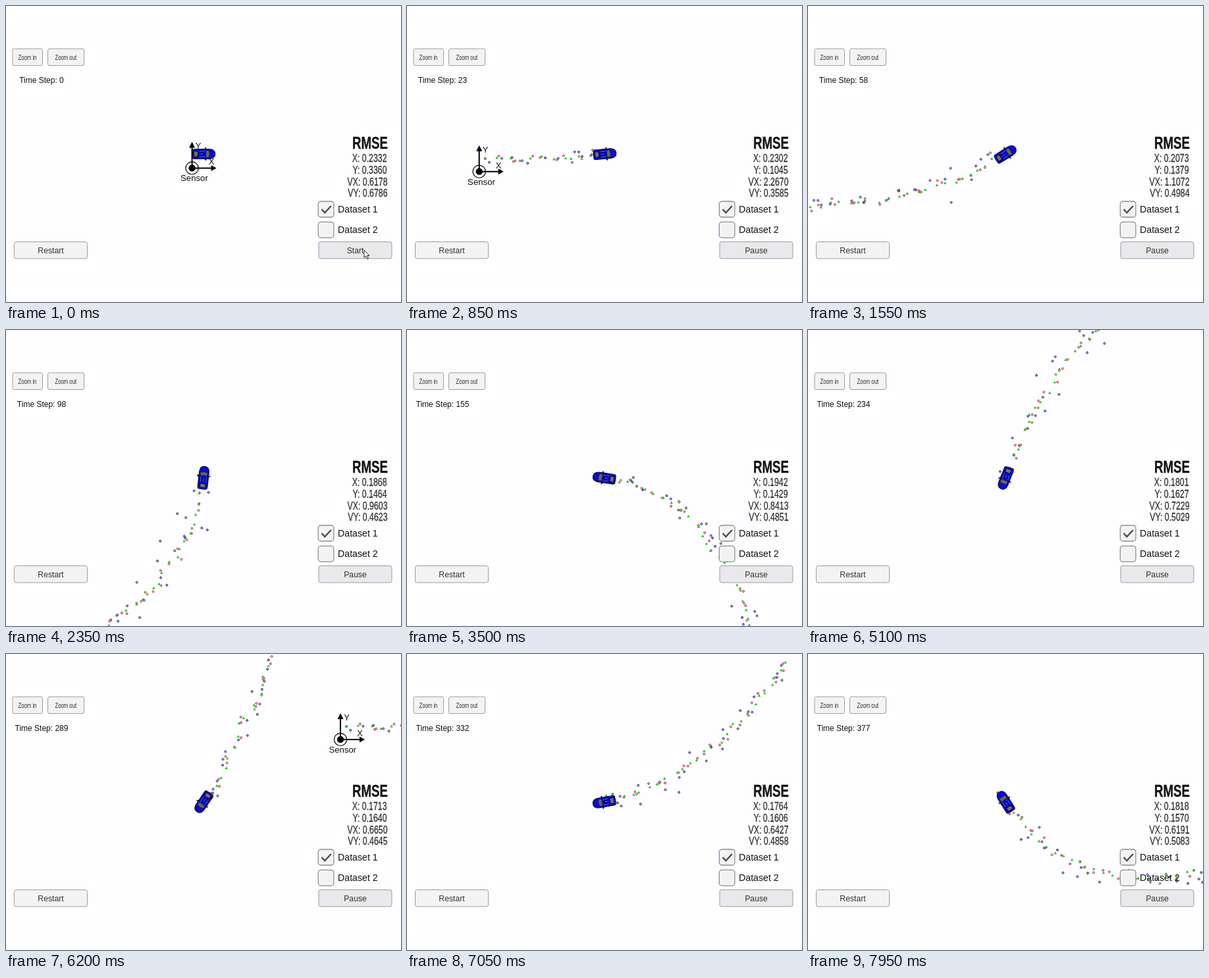
An HTML page for the animation above (8000 ms loop, 600 by 450 pixels).

```html
<!DOCTYPE html>
<html lang="en">
<head>
<meta charset="utf-8">
<title>Tracking simulator</title>
<style>
html, body { margin: 0; width: 100%; height: 100%; overflow: hidden; background: #fefdff; }
svg { display: block; width: 600px; height: 450px; }
text { font-family: "Liberation Sans", Arial, sans-serif; fill: #111; }
.btn { stroke: #9c9c9e; stroke-width: 1; }
.label { font-size: 12.2px; fill: #333; text-anchor: middle; }
.narrow { font-size: 15.8px; fill: #2c2c2c; stroke: #2c2c2c; stroke-width: .25; text-anchor: end; }
.small { font-size: 11px; fill: #2c2c2c; text-anchor: middle; }
.laser { fill: #fff; stroke: #a01020; }
.radar { fill: #e4e4f4; stroke: #06065c; }
.guess { fill: #1ec41e; }
</style>
</head>
<body>
<svg viewBox="0 0 600 450">
  <rect width="600" height="450" fill="#fefdff"/>
  <g id="trail"></g>
  <g id="car">
    <path d="M2 -7.8L3.5 -9.2V-7M2 7.8L3.5 9.2V7" fill="none" stroke="#05052a" stroke-width="1.3"/>
    <path d="M-16.5 -6.2Q-16 -7.4 -13 -7.4H9Q17.8 -7 17.8 0Q17.8 7 9 7.4H-13Q-16 7.4 -16.5 6.2Q-17.5 0 -16.5 -6.2Z" fill="#0b0bdc" stroke="#04043c" stroke-width="1"/>
    <path d="M-14.5 -5.2Q-9 -6.2 -7.5 -4.6V4.6Q-9 6.2 -14.5 5.2Q-15.4 0 -14.5 -5.2Z" fill="#0a0a50"/>
    <path d="M-13.6 -3.9L-9.2 -3.3V3.3L-13.6 3.9Q-14.2 0 -13.6 -3.9Z" fill="#74746a"/>
    <path d="M3 -4.6L8 -6Q11 0 8 6L3 4.6Q4.6 0 3 -4.6Z" fill="#66665e" stroke="#0a0a40" stroke-width=".8"/>
    <path d="M-7 -6H3M-7 6H3M-6 -2.4H0Q1.4 0 0 2.4H-6" fill="none" stroke="#05054a" stroke-width=".9"/>
    <path d="M-6 -4.2H2M-6 4.2H2M-5 0H-1" stroke="#3a70f0" stroke-width=".9"/>
    <path d="M11 -4.6Q14 -3.6 15 -2M11 4.6Q14 3.6 15 2" fill="none" stroke="#0505a0" stroke-width=".8"/>
  </g>
  <g id="sensor">
    <path d="M0 0V-33M0 0H31" stroke="#000" stroke-width="2" fill="none"/>
    <path d="M0 -40L4.5 -31H-4.5ZM37 0L29 -4.5V4.5Z"/>
    <circle r="9.6" fill="none" stroke="#000" stroke-width="1.2"/>
    <circle r="5.2"/>
    <text x="9.5" y="-29" font-size="13" text-anchor="middle">Y</text>
    <text x="29.5" y="-5" font-size="13" text-anchor="middle">X</text>
    <text x="3.3" y="20" font-size="13.2" text-anchor="middle">Sensor</text>
  </g>

  <g fill="#f4f3f4">
    <rect class="btn" x="10" y="65" width="45.5" height="25.5" rx="2.5"/>
    <rect class="btn" x="63.5" y="65" width="55" height="25.5" rx="2.5"/>
    <rect class="btn" x="12.5" y="358.5" width="111" height="25.5" rx="3"/>
    <rect class="btn" id="run" x="475" y="358.5" width="111" height="25.5" rx="3"/>
    <g stroke="#8e8e90" stroke-width="1.3">
      <rect x="474.3" y="297" width="23.6" height="24" rx="4"/>
      <rect x="474.3" y="328.3" width="23.6" height="24" rx="4"/>
    </g>
  </g>
  <path d="M479.5 309L484.3 314.3L493.8 304" fill="none" stroke="#4c4c4c" stroke-width="2.4"/>
  <text class="small" transform="translate(32.5 82) scale(.7 1)">Zoom in</text>
  <text class="small" transform="translate(90.8 82) scale(.7 1)">Zoom out</text>
  <text id="step" x="54" y="116.6" font-size="12" text-anchor="middle"></text>
  <text class="label" x="68" y="375.8">Restart</text>
  <text class="label" id="runLabel" x="530.5" y="375.8"></text>
  <text x="504" y="313.5" font-size="14.2">Dataset 1</text>
  <text x="504" y="345" font-size="14.2">Dataset 2</text>
  <text transform="translate(553 217) scale(.75 1)" font-size="25" font-weight="bold" text-anchor="middle" stroke="#111" stroke-width=".3">RMSE</text>
  <g id="errors">
    <text class="narrow" transform="translate(578.5 236.5) scale(.78 1)"></text>
    <text class="narrow" transform="translate(578.5 254.5) scale(.78 1)"></text>
    <text class="narrow" transform="translate(579.5 273) scale(.78 1)"></text>
    <text class="narrow" transform="translate(579.5 290) scale(.78 1)"></text>
  </g>
  <path id="cursor" d="M0 0V11.5L2.6 9.2L4.6 13.6L6.5 12.8L4.6 8.5H8Z" fill="#fff" stroke="#111" stroke-width=".9"/>
</svg>
<script>
const LOOP = 8000, TICK = 50, SCALE = 29, CX = 300, CY = 225, LAST = 380;
const $ = id => document.getElementById(id);

// time, step, then the errors in x, y, vx, vy
const keys = [
  [0, 0, .2332, .3360, .6178, .6786],
  [390, 0, .2332, .3360, .6178, .6786],
  [410, 1, .2882, .0200, 5.2, .0046],
  [1550, 58, .2073, .1379, 1.1072, .4984],
  [2350, 98, .1868, .1464, .9603, .4623],
  [3500, 155, .1942, .1429, .8413, .4851],
  [5100, 234, .1801, .1627, .7229, .5029],
  [6200, 289, .1713, .1640, .6650, .4645],
  [7950, 377, .1818, .1570, .6191, .5083]
];
const names = ['X', 'Y', 'VX', 'VY'];

let seed = 20177;
const rand = () => (seed = (seed * 16807) % 2147483647) / 2147483647;
const gauss = () => (rand() + rand() + rand() + rand() - 2) * 1.73;

// Figure-eight drive: sinusoidal yaw rate, gently varying speed, 0.05 s per step
const path = [];
const phase = k => 2 * Math.PI * k / 500;
const heading = k => .55 * 12.5 / Math.PI * (1 - Math.cos(phase(k)));
for (let k = 0, x = .6, y = .6; k <= LAST; k++) {
  path.push({ x, y, a: heading(k) });
  const m = k + .5, d = .05 * (5 + .2 * Math.cos(2 * phase(m)));
  x += d * Math.cos(heading(m));
  y += d * Math.sin(heading(m));
}

function add(tag, cls, attrs) {
  const el = document.createElementNS('http://www.w3.org/2000/svg', tag);
  el.setAttribute('class', cls);
  for (const n in attrs) el.setAttribute(n, attrs[n]);
  $('trail').appendChild(el);
  return el;
}
const ring = (cls, x, y) => add('circle', cls, { cx: x * SCALE, cy: -y * SCALE, r: 1.4 });

// Laser on even steps, radar on odd ones, an estimate with each laser reading
let ex = -.288, ey = -.02;
const marks = path.map((p, k) => {
  if (k % 2) {
    const r = Math.hypot(p.x, p.y) + .3 * gauss();
    const b = Math.atan2(p.y, p.x) + .03 * gauss();
    return [ring('radar', r * Math.cos(b), r * Math.sin(b))];
  }
  const nx = k ? .15 * gauss() : ex, ny = k ? .15 * gauss() : ey;
  if (k) {
    ex = .5 * ex + .5 * nx + .07 * gauss();
    ey = .5 * ey + .5 * ny + .07 * gauss();
  }
  const gx = ((p.x + ex) * SCALE).toFixed(1), gy = (-(p.y + ey) * SCALE).toFixed(1);
  return [
    ring('laser', p.x + nx, p.y + ny),
    add('path', 'guess', { d: `M${gx} ${gy}m0 -2.2l2.2 3.9h-4.4z` })
  ];
});

function state(t) {
  let i = 0;
  while (i < keys.length - 2 && t >= keys[i + 1][0]) i++;
  const a = keys[i], b = keys[i + 1];
  const f = (t - a[0]) / (b[0] - a[0]);
  const g = i === 2 ? f ** .35 : f; // errors settle quickly at first
  return a.map((v, n) => v + (b[n] - v) * (n > 1 ? g : f));
}

function draw(ms) {
  const t = Math.floor((ms % LOOP) / TICK) * TICK;
  const s = state(t);
  const k = Math.min(LAST, Math.round(s[1]));
  const p = path[k];
  const ox = CX - p.x * SCALE, oy = CY + p.y * SCALE;

  $('trail').setAttribute('transform', `translate(${ox} ${oy + 1})`);
  $('sensor').setAttribute('transform', `translate(${ox} ${oy + 4})`);
  $('car').setAttribute('transform', `translate(${CX} ${CY}) rotate(${-p.a * 180 / Math.PI})`);
  marks.forEach((m, i) => {
    const show = k > 0 && i <= k ? '' : 'none';
    m.forEach(el => { if (el.style.display !== show) el.style.display = show; });
  });

  $('step').textContent = 'Time Step: ' + k;
  names.forEach((n, i) => {
    $('errors').children[i].textContent = n + ': ' + s[i + 2].toFixed(4);
  });
  $('runLabel').textContent = t < 300 ? 'Start' : 'Pause';
  $('run').setAttribute('fill', t >= 150 && t < 300 ? '#d2d2d4' : '#e9e8ea');

  const c = Math.max(0, (t - 300) / 550);
  $('cursor').setAttribute('transform', `translate(${544 + 58 * c * c} ${371 + 50 * c * c})`);
  $('cursor').style.display = c < 1 ? '' : 'none';
}

const start = performance.now();
function loop() {
  draw(performance.now() - start);
  requestAnimationFrame(loop);
}
draw(0);
loop();
</script>
</body>
</html>
```
